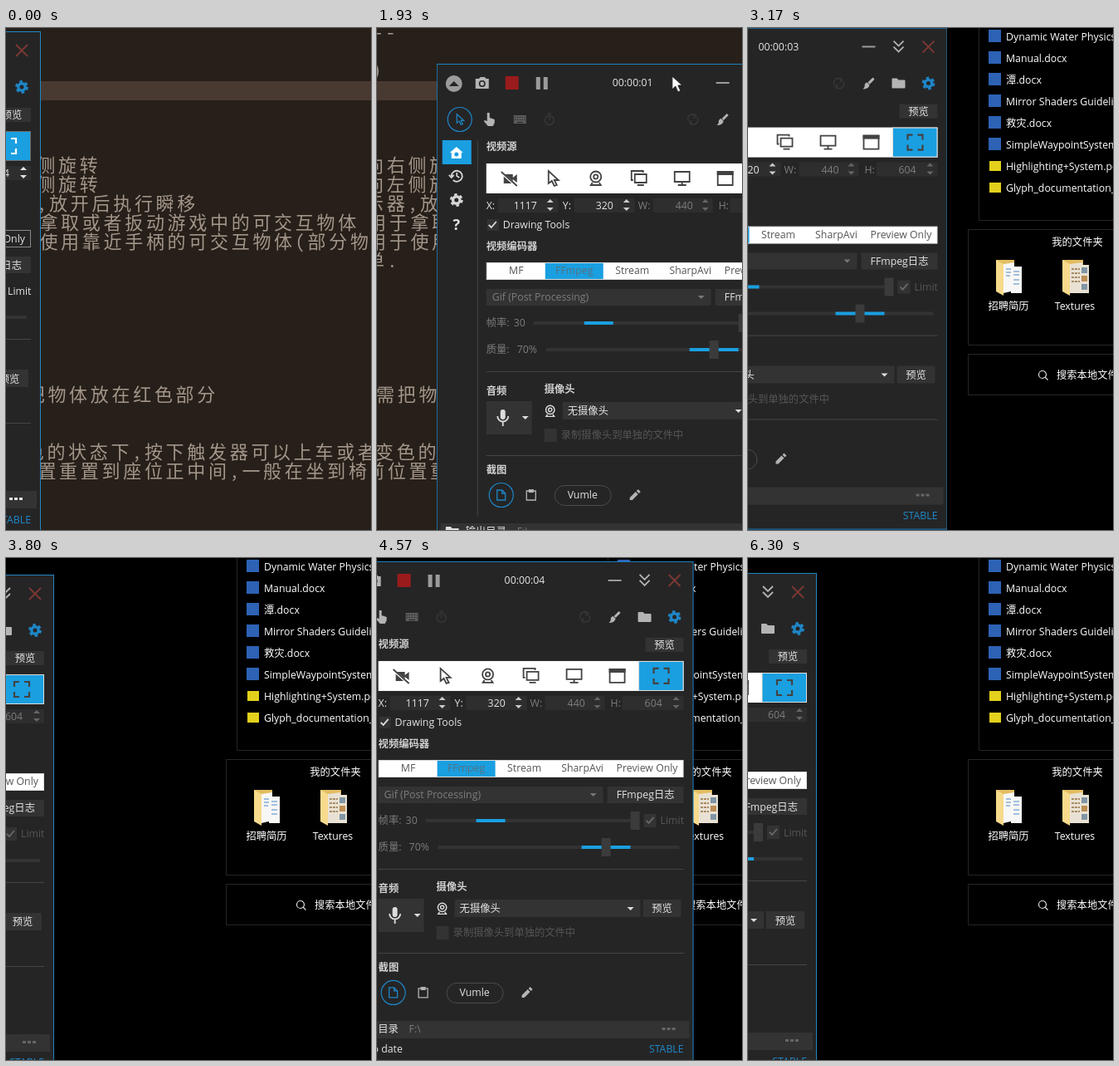
An HTML page for the animation above (6.33 s loop, 440 by 604 pixels).

```html
<!DOCTYPE html>
<html lang="zh-CN">
<head>
<meta charset="utf-8">
<title>Dragged window</title>
<style>
html, body { margin: 0; width: 100%; height: 100%; overflow: hidden; background: #000; }
svg { display: block; }
text { font: 12.3px "Open Sans", "Noto Sans CJK SC", sans-serif; fill: #e4e4e4; white-space: pre; }
.mid { text-anchor: middle; }
.bold { font-weight: 700; fill: #d2d2d2; }
.dim { fill: #7d7d7d; }
.faint { fill: #565656; }
.tab { fill: #555; text-anchor: middle; }
.tab.picked { fill: #56707f; }
.white text { fill: #fff; }
.editor text { font: 300 22px "Noto Sans Mono CJK SC", "Noto Sans CJK SC", monospace; letter-spacing: 3.7px; fill: #a2968a; }
.box { fill: #333334; }
.num { fill: #2e2e2f; }
.rule { stroke: #454546; }
.panel { fill: none; stroke: #262626; }
.blue { fill: #1a9fe0; }
.line { fill: none; stroke: currentColor; stroke-width: 1.8; }
.fill { fill: currentColor; }
.grey { color: #b4b4b4; }
.dark { color: #353536; }
.ink { color: #424242; }
.sky { color: #1e86c6; }

.win { animation: drag 6330ms infinite; }
.gone { animation: gone 6330ms step-end infinite; }
.lead { animation: lead 6330ms infinite; }
.idle .live { fill: #e4e4e4; color: #e4e4e4; }
.idle .cell { fill: #252526; stroke: #8a8a8a; }
.idle .ring { color: #fff; }
.idle .edge { stroke: #6a6a6a; }
.idle .knob { visibility: hidden; }

@keyframes drag {
  0%, 1.1% { transform: translate(-398px, 4px); animation-timing-function: ease-in-out; }
  7.11% { transform: translate(40px, 30px); animation-timing-function: ease-in-out; }
  14.69% { transform: translate(-330px, 55px); animation-timing-function: ease-in; }
  21.01% { transform: translate(-110px, 67px); animation-timing-function: ease-out; }
  26.54% { transform: translate(106px, 60px); animation-timing-function: ease-in; }
  30.49% { transform: translate(72px, 43px); animation-timing-function: cubic-bezier(.4, .1, .6, 1); }
  36.81% { transform: translate(-310px, 20px); animation-timing-function: ease-in-out; }
  44.23% { transform: translate(88px, -24px); animation-timing-function: ease-in-out; }
  54.5% { transform: translate(-375px, 14px); animation-timing-function: ease-out; }
  60.03% { transform: translate(-382px, 20px); animation-timing-function: linear; }
  63.98% { transform: translate(-380px, 18px); animation-timing-function: ease-in; }
  72.2% { transform: translate(-59px, 4px); animation-timing-function: ease-out; }
  76.15% { transform: translate(60px, -4px); animation-timing-function: ease-in-out; }
  85.31% { transform: translate(-350px, 17px); animation-timing-function: ease-out; }
  93.2%, 100% { transform: translate(-357px, 18px); }
}
@keyframes gone { 0% { visibility: visible; } 48.5%, 100% { visibility: hidden; } }
@keyframes lead {
  0%, 14.7% { transform: translate(287px, 15px); }
  21.01% { transform: translate(293px, 15px); }
  30.49%, 36.81% { transform: translate(284px, 15px); }
  44.23%, 100% { transform: translate(287px, 15px); }
}
</style>
</head>
<body>
<svg width="440" height="604" viewBox="0 0 440 604">
<defs>
  <g id="gear" class="line"><circle r="4.2" stroke-width="3.4"/><circle r="6.4" stroke-width="3" stroke-dasharray="3.35"/></g>
  <path id="folder" class="fill" d="M-8-5q0-1 1-1h5l2 2h7q1 0 1 1v8q0 1-1 1H-7q-1 0-1-1z"/>
  <path id="arrow" class="line" d="M-5-9V6l4-3 3 6 3-1-3-6h5z"/>
  <g id="webcam" class="line"><circle cy="-2" r="6.5"/><circle cy="-2" r="2.6"/><path d="M-4 5l-2 3H6L4 5"/></g>
  <path id="spin" class="fill" d="M-4-3l4-4 4 4zM-4 3l4 4 4-4z"/>
  <path id="caret" class="fill" d="M-4-2h8L0 2z"/>
  <path id="tick" class="line" d="M-4 0l3 3 6-7"/>
  <rect id="word" x="290" y="-8" width="15" height="15" fill="#2d62b5"/>
  <rect id="pdf" x="291" y="-6" width="14" height="12" fill="#e3d01c"/>
</defs>

<rect width="440" height="604"/>
<g class="white">
  <path class="panel" d="M440 231.5H278.5V-1M440 242.5H265.5V381.5H440M440 392.5H265.5V441.5H440"/>
  <use href="#word" y="10"/><text x="311" y="15">Dynamic Water Physics</text>
  <use href="#word" y="36"/><text x="311" y="41">Manual.docx</text>
  <use href="#word" y="62"/><text x="311" y="67">潭.docx</text>
  <use href="#word" y="88"/><text x="311" y="93">Mirror Shaders Guidelines</text>
  <use href="#word" y="114"/><text x="311" y="119">救灾.docx</text>
  <use href="#word" y="140"/><text x="311" y="145">SimpleWaypointSystem</text>
  <use href="#pdf" y="166"/><text x="311" y="171">Highlighting+System.pdf</text>
  <use href="#pdf" y="192"/><text x="311" y="197">Glyph_documentation_</text>
  <text class="mid" x="397" y="262">我的文件夹</text>
  <g transform="translate(299 278)">
    <path fill="#e3bd62" d="M0 1h22v38H0z"/>
    <path fill="#f7f7f5" d="M9 6l13-2v34L9 41zM18 9h13v32H18z"/>
    <path stroke="#4c86c6" d="M12 12h6M12 16h6M12 20h5M21 15h7M21 19h7M21 25h7M21 30h7"/>
    <path fill="#f7da8c" d="M0 1l9 5v38L0 39z"/>
  </g>
  <g transform="translate(379 278)">
    <path fill="#e3bd62" d="M0 1h25v38H0z"/>
    <path fill="#e9e2d4" d="M9 6l15-2v37H9zM21 7h11v34H21z"/>
    <path stroke="#a98a64" stroke-width="2" stroke-dasharray="3 1" d="M11 12h10M11 17h10M11 22h10M11 27h10"/>
    <path fill="#8195a5" d="M23 10h7v7h-7zM23 30h7v7h-7z"/><path fill="#bd8d55" d="M23 20h7v7h-7z"/>
    <path fill="#f7da8c" d="M0 1l9 5v38L0 39z"/>
  </g>
  <text class="mid" x="314" y="339">招聘简历</text>
  <text class="mid" x="394" y="339">Textures</text>
  <path fill="none" stroke="#ddd" stroke-width="1.2" d="M358.500 420.500l3 3M350.500 417a4.500 4.500 0 1 0 9 0a4.500 4.500 0 1 0-9 0"/>
  <text x="372" y="422">搜索本地文件</text>
</g>

<g class="editor gone">
  <rect width="440" height="604" fill="#271f19"/>
  <rect y="64" width="440" height="23" fill="#493a31"/>
  <text x="-4" y="13">--</text>
  <text x="-6" y="59">)</text>
  <text x="-14" y="173">向右侧旋转</text>
  <text x="-14" y="196">向左侧旋转</text>
  <text x="-14" y="219">示器,放开后执行瞬移</text>
  <text x="-11" y="242">用于拿取或者扳动游戏中的可交互物体</text>
  <text x="-11" y="265">用于使用靠近手柄的可交互物体(部分物</text>
  <text x="-13" y="288">单.</text>
  <text x="-1" y="449">需把物体放在红色部分</text>
  <text x="-2" y="518">变色的状态下,按下触发器可以上车或者</text>
  <text x="-13" y="541">前位置重置到座位正中间,一般在坐到椅</text>
</g>

<g class="win" id="win">
  <rect x=".5" y=".5" width="439" height="603" fill="#252526" stroke="#1f86c4"/>

  <!-- title bar -->
  <g class="grey">
    <circle cx="21" cy="24" r="10" fill="#9b9b9b"/><path d="M15 27l6-6 6 6z" fill="#252526"/>
    <path class="fill" d="M47 18h4l2-2h5l2 2h3v12H47z"/><circle cx="55" cy="24" r="3.200" fill="none" stroke="#252526" stroke-width="1.6"/>
    <path fill="#9a1b1b" d="M83 15h16v16H83z"/>
    <path fill="#9b9b9b" d="M120 16h5v15h-5zM129 16h5v15h-5zM337 22h16v2h-16z"/>
    <path class="line" stroke-width="2" d="M375 16l6 6 6-6M375 23l6 6 6-6"/>
  </g>
  <text id="clock" x="212" y="27.500">00:00:00</text>
  <path stroke="#7b3732" stroke-width="2" d="M410 16l14 14M424 16l-14 14"/>

  <!-- tools -->
  <g class="sky">
    <circle class="line" cx="28" cy="67" r="14.500" style="stroke-width:1.200"/>
    <use href="#arrow" transform="translate(28 67) scale(.7)"/>
    <use href="#gear" x="417" y="67"/>
  </g>
  <g class="grey">
    <path class="fill" d="M61 59h3v6l6 2v4l-2 4h-6l-5-6 1-1 3 1z"/>
    <path class="line" style="stroke-width:3" d="M351 61l-6 6"/><path class="fill" d="M343 66l3 3q-1 5-8 5 3-3 2-5 1-3 3-3z"/>
    <use href="#folder" x="381" y="67"/>
  </g>
  <path fill="#5c5c5c" d="M93 62h15v10H93z"/>
  <path stroke="#252526" stroke-dasharray="1.500" d="M94 64.500h13M94 67.500h13"/><path stroke="#252526" d="M97 70.500h7"/>
  <g class="line dark">
    <circle cx="136" cy="68" r="5.500"/><path d="M134 60h4M136 68v-4"/>
    <path d="M304 69a5 5 0 0 1 8-6M314 65a5 5 0 0 1-8 6M310 60l3 3-3 3M308 68l-3 3 3 3"/>
  </g>

  <!-- side bar -->
  <rect class="blue" x="7" y="92" width="35" height="29"/>
  <path fill="#fff" d="M16 107l8-7 8 7h-2v7H18v-7z"/><circle cx="24" cy="109" r="2.500" class="blue"/>
  <g style="color:#d6d6d6">
    <path class="line" d="M18 135a6.500 6.500 0 1 1 2 5M15 134l3 3 3-3M24.500 131v4l3 2"/>
    <use href="#gear" x="24" y="164"/>
  </g>
  <text class="mid" x="24" y="200" style="font-size:18px;font-weight:700">?</text>
  <path class="rule" d="M49.500 92V545M60 370.500H428M60 471.500H428"/>

  <!-- video source -->
  <text class="bold" x="60" y="104.500">视频源</text>
  <rect class="box" x="382" y="92" width="46" height="17"/><text class="mid" x="405" y="105">预览</text>
  <rect x="60" y="120" width="368" height="36" fill="#fff"/>
  <rect class="blue edge" x="374" y="120.500" width="53.500" height="35" stroke="#ddd"/>
  <g class="ink">
    <g transform="translate(88 138)"><path class="fill" d="M-7-5H4v4l5-4V5L4 1v5H-7z"/><path stroke="#fff" stroke-width="3" d="M-9-6L8 9"/><path class="line" d="M-10-8L9 9"/></g>
    <use href="#arrow" x="140" y="138"/>
    <use href="#webcam" x="192" y="138"/>
    <path class="line" d="M239 133h14v10h-14zM237 140h-2v-11h14v2M242 146h8"/>
    <path class="line" d="M287 130h18v12h-18zM296 142v4M291 146h10"/>
    <path class="line" d="M339 130h18v16h-18z"/><path class="fill" d="M338 129h20v5h-20z"/>
    <path class="line ring" style="stroke-width:2.200" d="M392 135v-6h6M404 129h6v6M410 141v6h-6M398 147h-6v-6"/>
  </g>

  <!-- region -->
  <path class="num" d="M74 162h73v17H74zM166 162h73v17h-73zM261 162h72v17h-72zM354 162h74v17h-74z"/>
  <text x="60" y="175">X:</text><text x="93" y="175">1117</text>
  <text x="152" y="175">Y:</text><text x="192" y="175">320</text>
  <text class="dim" x="243" y="175">W:</text><text class="dim" x="288" y="175">440</text>
  <text class="dim" x="340" y="175">H:</text><text class="dim live" x="381" y="175">604</text>
  <g style="color:#ccc"><use href="#spin" x="137" y="170"/><use href="#spin" x="229" y="170"/></g>
  <g style="color:#666"><use href="#spin" x="324" y="170"/><use href="#spin" class="live" x="419" y="170"/></g>
  <rect class="box" x="61" y="187" width="14" height="14"/><use href="#tick" x="67" y="194" color="#ddd"/>
  <text x="80" y="198.500">Drawing Tools</text>

  <!-- encoder -->
  <text class="bold" x="60" y="224.500">视频编码器</text>
  <rect class="cell" x="60.500" y="239.500" width="367" height="20" fill="#fff" stroke="#ddd"/>
  <rect class="blue" x="131" y="240" width="70" height="19"/>
  <text class="tab" x="96" y="253.500">MF</text>
  <text class="tab picked" x="166" y="253.500">FFmpeg</text>
  <text class="tab" x="236" y="253.500">Stream</text>
  <text class="tab" x="306" y="253.500">SharpAvi</text>
  <text class="tab live" x="384" y="253.500">Preview Only</text>
  <path class="box" d="M60 271h271v20H60zM336 271h92v20h-92z"/>
  <text class="dim" x="67" y="285.500">Gif (Post Processing)</text><use href="#caret" x="319" y="281" color="#777"/>
  <text class="mid" x="382" y="285.500">FFmpeg日志</text>

  <!-- sliders -->
  <text class="dim" x="60" y="316.500">帧率:</text><text class="dim" x="93" y="316.500">30</text>
  <path class="box" d="M117 310h252v4H117zM132 342h291v4H132z"/>
  <path class="blue knob" d="M178 310h35v4h-35zM305 342h59v4h-59z"/>
  <path class="knob" fill="#3b3b3c" d="M364 301h11v22h-11zM329 333h11v22h-11z"/>
  <rect class="box" x="380" y="304" width="15" height="16"/><use href="#tick" x="387" y="312" color="#6a6a6a"/>
  <text class="faint live" x="400" y="316.500">Limit</text>
  <text class="dim" x="60" y="348.500">质量:</text><text class="dim" x="97" y="348.500">70%</text>

  <!-- audio and webcam -->
  <text class="bold" x="60" y="398.500">音频</text>
  <text class="bold" x="130" y="396.500">摄像头</text>
  <path class="box" d="M60 406h55v40H60zM152 407h224v21H152zM379 407h46v21h-46zM130 439h15v16h-15z"/>
  <g style="color:#ddd">
    <rect class="fill" x="77" y="416" width="6" height="12" rx="3"/><path class="line" d="M73.500 424a6.500 6.500 0 0 0 13 0M80 431v5"/>
    <use href="#caret" x="107" y="426"/><use href="#caret" x="364" y="418"/>
    <use href="#webcam" transform="translate(137 418) scale(.8)"/>
  </g>
  <text x="158" y="422.500">无摄像头</text><text class="mid" x="402" y="422.500">预览</text>
  <text class="faint" x="150" y="451.500">录制摄像头到单独的文件中</text>

  <!-- screenshot -->
  <text class="bold" x="60" y="493.500">截图</text>
  <g class="sky">
    <circle class="line" cx="78" cy="519" r="14.500" style="stroke-width:1.200"/>
    <path class="line" style="stroke-width:1.300" d="M73 513h6l4 4v8H73zM79 513v4h4"/>
  </g>
  <g class="grey">
    <path class="line" style="stroke-width:1.300" d="M108.500 514h11v11h-11z"/><path class="fill" d="M111 512h6v4h-6z"/>
    <path class="fill" d="M233 525v-3l7-7 3 3-7 7zM241 514l2-2 3 3-2 2z"/>
  </g>
  <rect x="142.500" y="507.500" width="68" height="24" rx="12" fill="none" stroke="#4c4c4d"/>
  <text class="mid" x="176" y="523.500">Vumle</text>

  <!-- output and status -->
  <rect class="box" x="5" y="553" width="430" height="21"/>
  <use href="#folder" x="19" y="563" color="#ddd"/>
  <text x="35" y="567.500">输出目录</text><text class="dim" x="97" y="567.500">F:\</text>
  <path class="live" fill="#666" d="M402 561h4v3h-4zM408 561h4v3h-4zM414 561h4v3h-4z"/>
  <use href="#tick" x="17" y="587" color="#4e9a51"/>
  <text x="29" y="591.500">Up to date</text>
  <text x="428" y="591.500" text-anchor="end" style="fill:#1e8acb">STABLE</text>

  <g class="gone"><path class="lead" d="M0 0V16l4-4 3 7 3-1.500-3-6.500h5z" fill="#fff" stroke="#111" stroke-width=".8"/></g>
</g>
</svg>
<script>
const LOOP = 6330;
const win = document.getElementById('win');
const clock = document.getElementById('clock');
const drag = win.getAnimations()[0];

function tick() {
  const t = (drag.currentTime || 0) % LOOP;
  clock.textContent = `00:00:0${Math.floor(t / 1000)}`;
  win.classList.toggle('idle', t < 70);
  requestAnimationFrame(tick);
}
tick();
</script>
</body>
</html>
```
